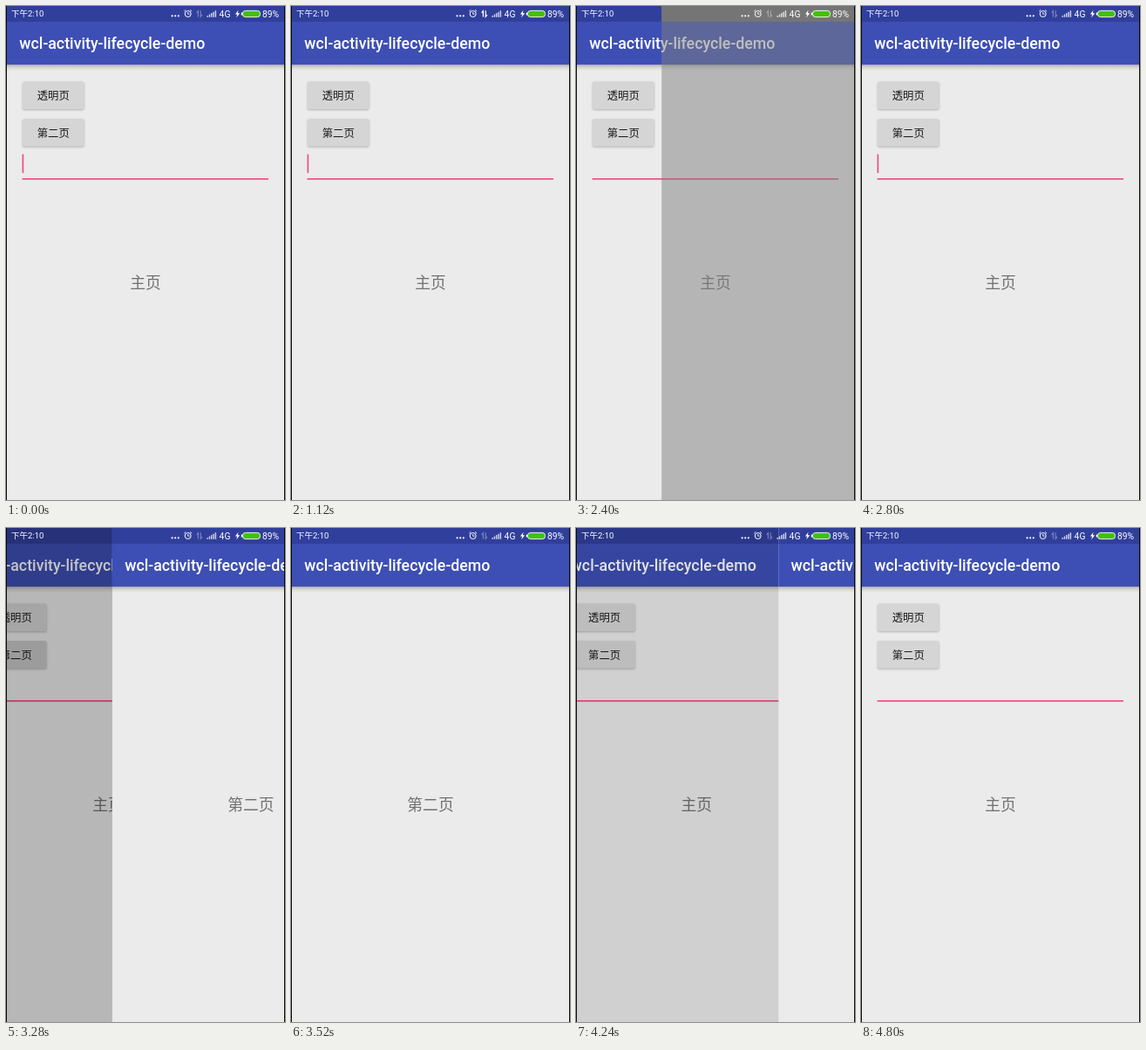
These frames come from a looping animation (320 by 565 pixels, 5200 ms). An HTML page:

```html
<!DOCTYPE html>
<html lang="zh-CN">
<head>
<meta charset="utf-8">
<title>Activity lifecycle demo</title>
<style>
  html, body { margin: 0; width: 100%; height: 100%; overflow: hidden; background: #000; }
  svg { display: block; width: 100vw; height: 100vh; }
  text { font-family: Roboto, "Noto Sans CJK SC", "Noto Sans CJK", sans-serif; }
  .title { font-size: 17.8px; font-weight: 500; fill: #fff; }
  .label { font-size: 17.8px; fill: #717171; text-anchor: middle; }
  .btn rect { fill: #d5d5d5; filter: drop-shadow(0 1px .8px rgba(0, 0, 0, .25)); }
  .btn text { font-size: 12.4px; font-weight: 500; fill: #1c1c1c; text-anchor: middle; }
  .ripple { fill: #000; }
  .status { fill: #fff; }
  .status text { font-size: 10.3px; }
  .line { fill: none; stroke: #fff; }
</style>
</head>
<body>
<svg viewBox="0 0 320 565" preserveAspectRatio="none">
  <defs>
    <linearGradient id="fade" x2="0" y2="1">
      <stop stop-color="#000" stop-opacity=".27"/>
      <stop offset=".4" stop-color="#000" stop-opacity=".1"/>
      <stop offset="1" stop-color="#000" stop-opacity="0"/>
    </linearGradient>
    <clipPath id="clipA"><rect x="19" y="86.5" width="70.5" height="31.5" rx="2"/></clipPath>
    <clipPath id="clipB"><rect x="19" y="129" width="70.5" height="31.5" rx="2"/></clipPath>
    <g id="base">
      <rect x="1" width="318" height="565" fill="#ebebeb"/>
      <rect x="1" y="67" width="318" height="7" fill="url(#fade)"/>
      <rect x="1" y="17" width="318" height="50" fill="#3d4fb4"/>
      <rect x="1" width="318" height="18" fill="#313f9c"/>
      <text class="title" x="15.3" y="49.3">wcl-activity-lifecycle-demo</text>
    </g>
  </defs>

  <g id="home">
    <use href="#base"/>
    <g class="btn">
      <rect x="19" y="86.5" width="70.5" height="31.5" rx="2"/>
      <g clip-path="url(#clipA)"><circle id="rippleA" class="ripple" cx="54" cy="102.5"/></g>
      <text x="54.3" y="107.3">透明页</text>
    </g>
    <g class="btn">
      <rect x="19" y="129" width="70.5" height="31.5" rx="2"/>
      <g clip-path="url(#clipB)"><circle id="rippleB" class="ripple" cx="54" cy="145"/></g>
      <text x="54.3" y="149.8">第二页</text>
    </g>
    <rect x="18.6" y="197" width="282.4" height="1.6" fill="#f0457f"/>
    <rect id="cursor" x="18.6" y="169.5" width="1.6" height="21.5" fill="#f0457f"/>
    <text class="label" x="160" y="322.8">主页</text>
  </g>
  <rect id="scrim" width="320" height="565"/>

  <g id="glass">
    <rect x="1" width="318" height="565" fill="#808080" fill-opacity=".5"/>
    <rect x="1" width="318" height="18" fill="#757575"/>
  </g>

  <g id="second">
    <use href="#base"/>
    <text class="label" x="160" y="322.8">第二页</text>
  </g>

  <g class="status">
    <text x="6" y="12.4" style="font-size:9.5px">下午2:10</text>
    <circle cx="190.6" cy="11.3" r="1.1"/>
    <circle cx="194.2" cy="11.3" r="1.1"/>
    <circle cx="197.8" cy="11.3" r="1.1"/>
    <g class="line">
      <circle cx="208.7" cy="9" r="3.5"/>
      <path d="M208.7 7v2.2h1.8M204.3 6.2l2-1.9M213.1 6.2l-2-1.9" stroke-width=".9"/>
      <path id="arrows" d="M220.4 12.6V5.6l-1.8 2.2M223.2 5.2v7l1.8-2.2" stroke-width="1.2"/>
      <path d="M231.2 12.7v-1.8M233.5 12.7v-3.2M235.8 12.7v-4.6M238.1 12.7v-6M240.4 12.7v-7.4" stroke-width="1.4" stroke-opacity=".8"/>
      <rect x="271.5" y="5.4" width="20" height="7.2" rx="3.2" fill="#43c10e" stroke-width=".9"/>
    </g>
    <rect x="269.8" y="7.5" width="1.3" height="3"/>
    <path d="M266.5 4.8l-3.6 4.6h2.3l-1 3.8 4-5h-2.4z"/>
    <text x="244.6" y="12.7">4G</text>
    <text x="294" y="12.7">89%</text>
  </g>
  <path d="M0 0h1v565h-1zM319 0h1v565h-1z" fill="#0a0a0a"/>
</svg>
<script>
const LOOP = 5200, STEP = 80, WIDTH = 318;
const $ = id => document.getElementById(id);
const clamp = v => Math.min(1, Math.max(0, v));
const between = (t, a, b) => t >= a && t < b;
const easeOut = (t, start, length) => 1 - (1 - clamp((t - start) / length)) ** 2;
const show = (id, on) => $(id).setAttribute('visibility', on ? 'visible' : 'hidden');
const shift = (id, x) => $(id).setAttribute('transform', `translate(${x.toFixed(2)} 0)`);

function ripple(id, age) {
  $(id).setAttribute('r', age > 0 ? 42 * clamp(age / 240) : 0);
  $(id).setAttribute('opacity', 0.14 * clamp((480 - age) / 200));
}

function render(t) {
  // Translucent page: appears at once, slides away to the right
  const away = easeOut(t, 2350, 300);
  show('glass', t >= 1600 && away < 1);
  shift('glass', WIDTH * away);

  // Second page slides over home, which trails behind under a scrim
  const close = easeOut(t, 4068, 360);
  const cover = easeOut(t, 3142, 360) - close;
  const trail = easeOut(t, 3164, 360) - close;
  show('second', cover > 0);
  shift('second', WIDTH * (1 - cover));
  shift('home', -WIDTH / 4 * trail);
  $('scrim').setAttribute('opacity', 0.41 * clamp(trail));

  ripple('rippleA', t - 1120);
  ripple('rippleB', t - 2880);
  show('cursor', t < 400 || between(t, 880, 1440) || between(t, 2640, 3120) || between(t, 4320, 4800));
  $('arrows').setAttribute('opacity', between(t, 1120, 1440) ? 1 : 0.35);
}

const begin = performance.now();
function tick() {
  const t = (performance.now() - begin) % LOOP;
  render(Math.floor(t / STEP) * STEP);
  requestAnimationFrame(tick);
}
tick();
</script>
</body>
</html>
```
